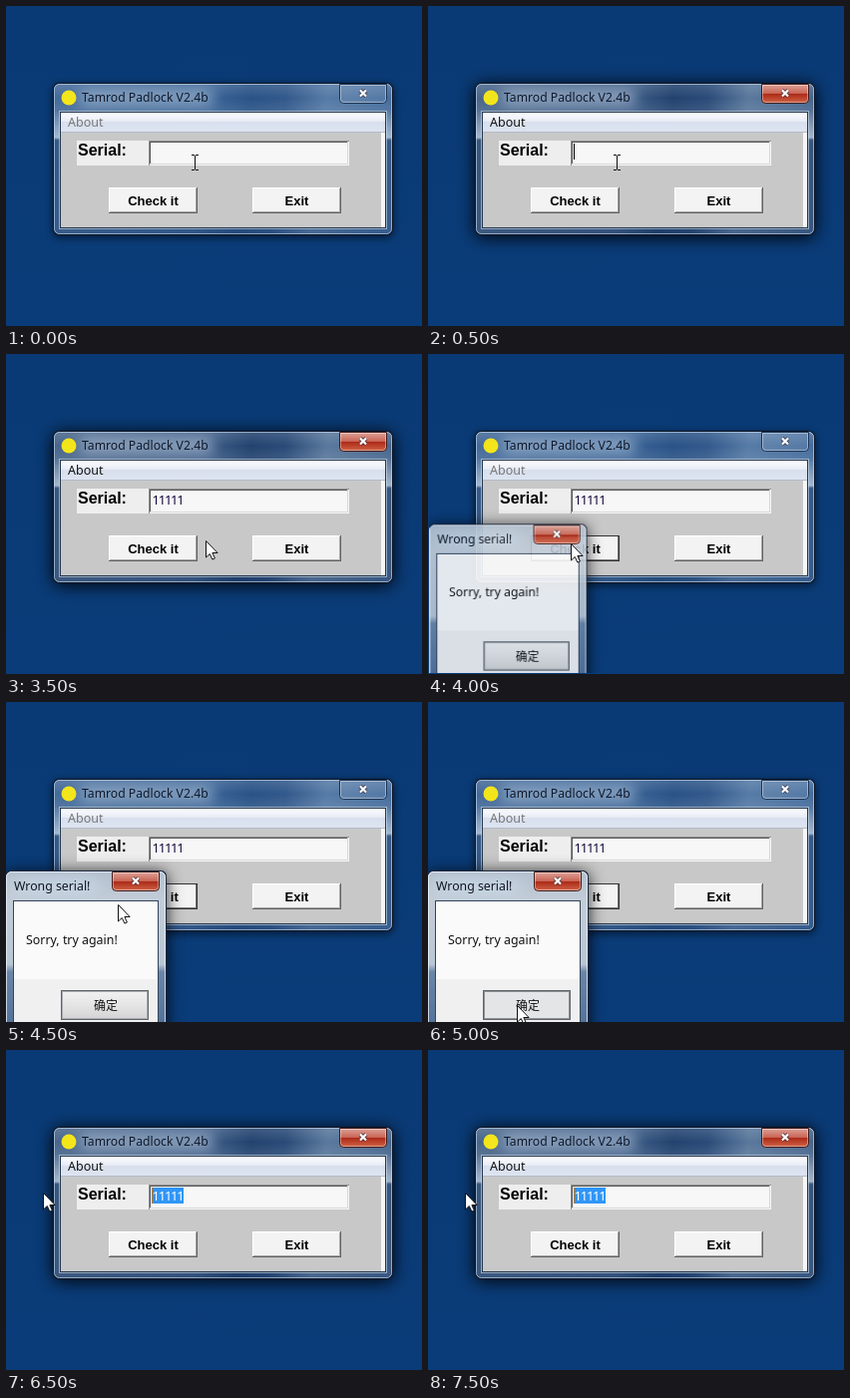
Write an HTML page with a canvas that moves like this. It is 417 px wide and 321 px high and loops after 8 s.

```html
<!DOCTYPE html>
<html lang="en">
<head>
<meta charset="utf-8">
<title>Serial check</title>
<style>
html, body { margin: 0; width: 417px; height: 321px; overflow: hidden; background: #093a77; }
canvas { display: block; }
</style>
</head>
<body>
<canvas id="stage" width="417" height="321"></canvas>
<script>
const W = 417, H = 321, STEP = 500, LOOP = 8000;
const screen = document.getElementById('stage').getContext('2d');
const layer = document.createElement('canvas');
layer.width = W;
layer.height = H;
let c = screen;

const UI = '"Noto Sans", "Open Sans", sans-serif';
const ARIAL = '"Liberation Sans", Arial, sans-serif';
const HAN = '"Noto Sans CJK SC", "Noto Sans CJK", "Noto Sans CJK JP", sans-serif';

// One entry per half second; missing keys mean "off".
const SERIAL = '11111';
const beam = { beam: [189, 157] };
const steps = [
  { idle: true, ...beam },
  { caret: 146, ...beam },
  { ...beam },
  { caret: 146, ...beam },
  { typed: 2, caret: 159 },
  { typed: 4, caret: 171 },
  { typed: 5, caret: 177 },
  { typed: 5, arrow: [200, 187] },
  { typed: 5, idle: true, focus: true, dialog: 'opening', arrow: [143, 190] },
  { typed: 5, idle: true, focus: true, dialog: 'open', arrow: [112, 203] },
  { typed: 5, idle: true, focus: true, dialog: 'hover', arrow: [89, 304] },
  { typed: 5, focus: true, dots: true, beam: [188, 157] },
  { typed: 5, caret: 177, beam: [174, 145] },
  { typed: 5, selected: true, caret: 146, arrow: [37, 143] },
  { typed: 5, selected: true, arrow: [37, 143] },
  { typed: 5, selected: true, caret: 146, arrow: [37, 143] }
];

function rect(x, y, w, h, fill) {
  c.fillStyle = fill;
  c.fillRect(x, y, w, h);
}

function frame(x, y, w, h, color) {
  c.strokeStyle = color;
  c.lineWidth = 1;
  c.strokeRect(x + 0.5, y + 0.5, w - 1, h - 1);
}

function round(x, y, w, h, r, fill, stroke) {
  c.beginPath();
  c.roundRect(x, y, w, h, r);
  if (fill) { c.fillStyle = fill; c.fill(); }
  if (stroke) { c.strokeStyle = stroke; c.lineWidth = 1; c.stroke(); }
}

function grad(x0, y0, x1, y1, ...stops) {
  const g = c.createLinearGradient(x0, y0, x1, y1);
  stops.forEach(([at, color]) => g.addColorStop(at, color));
  return g;
}

function text(str, x, y, font, color, align = 'left', spacing = 0) {
  c.font = font;
  c.fillStyle = color;
  c.textAlign = align;
  c.letterSpacing = spacing + 'px';
  c.fillText(str, x, y);
  c.letterSpacing = '0px';
}

function shadow(x, y, w, h, blur, alpha) {
  c.save();
  c.shadowColor = `rgba(0,0,0,${alpha})`;
  c.shadowBlur = blur;
  c.shadowOffsetY = 2;
  round(x, y, w, h, 6, '#10182a');
  c.restore();
}

function glow(x, y, w, h, alpha) {
  c.save();
  c.filter = 'blur(7px)';
  round(x, y, w, h, 8, `rgba(205,220,236,${alpha})`);
  c.restore();
}

function closeButton(x, y, w, h, active) {
  const fill = active
    ? grad(0, y, 0, y + h, [0, '#dda196'], [0.45, '#c96555'], [0.5, '#ad2b18'], [1, '#d2694c'])
    : 'rgba(255,255,255,0.08)';
  round(x + 0.5, y - 0.5, w - 1, h, [0, 0, 4, 4], fill, active ? '#421c1c' : '#1c3556');
  round(x + 1.5, y + 0.5, w - 3, h - 2, [0, 0, 3, 3], null, 'rgba(255,255,255,0.4)');
  const cx = x + w / 2, cy = y + h / 2 - 1;
  const cross = (width, color) => {
    c.lineWidth = width;
    c.strokeStyle = color;
    c.beginPath();
    c.moveTo(cx - 3, cy - 3); c.lineTo(cx + 3, cy + 3);
    c.moveTo(cx + 3, cy - 3); c.lineTo(cx - 3, cy + 3);
    c.stroke();
  };
  cross(4, 'rgba(50,40,55,0.65)');
  cross(2.2, '#fff');
}

function button(label, x, focus, dots) {
  const y = 182, w = 89, h = 26;
  rect(x, y, w, h, '#f3f3f3');
  rect(x, y, w, 1, '#fff');
  rect(x, y, 1, h, '#fff');
  rect(x, y + h - 1, w, 1, '#626262');
  rect(x + w - 1, y, 1, h, '#626262');
  rect(x + 1, y + h - 2, w - 2, 1, '#a5a5a5');
  rect(x + w - 2, y + 1, 1, h - 2, '#a5a5a5');
  if (focus) {
    frame(x, y, w, h, '#333');
    rect(x + 1, y + h - 2, w - 2, 1, '#777');
    rect(x + w - 2, y + 1, 1, h - 2, '#777');
  }
  if (dots) {
    c.setLineDash([1, 1]);
    c.lineDashOffset = 0.5;
    frame(x + 3, y + 3, w - 6, h - 6, '#000');
    c.setLineDash([]);
  }
  text(label, x + w / 2, 200, 'bold 13px ' + ARIAL, '#000', 'center');
}

function mainWindow(s) {
  const x = 47, y = 77, w = 341, h = 153, on = !s.idle;
  shadow(x, y, w, h, on ? 17 : 9, on ? 0.95 : 0.6);
  const fill = on
    ? grad(x, y, x + w, y + 40, [0, '#4a678b'], [0.46, '#3d5c86'], [0.58, '#23436f'], [0.68, '#2a4b78'], [0.8, '#5a789c'], [1, '#45658d'])
    : grad(x, y, x + w, y + 40, [0, '#456b99'], [0.46, '#3a6395'], [0.58, '#2a5387'], [0.68, '#32598b'], [0.8, '#567ba6'], [1, '#436b9c']);
  round(x + 0.5, y + 0.5, w - 1, h - 1, 6, fill, '#0c1526');
  c.save();
  c.beginPath();
  c.roundRect(x + 1, y + 1, w - 2, h - 2, 5);
  c.clip();
  rect(x, y, w, h, grad(0, y, 0, y + h,
    [0, 'rgba(255,255,255,0.14)'], [0.1, 'rgba(255,255,255,0)'], [0.18, 'rgba(255,255,255,0.08)'],
    [0.36, 'rgba(225,235,246,0.6)'], [0.38, 'rgba(10,40,85,0.25)'], [1, 'rgba(10,40,85,0.2)']));
  glow(72, 85, 136, 14, on ? 0.62 : 0.58);
  c.restore();
  round(x + 1.5, y + 1.5, w - 3, h - 3, 5, null, 'rgba(205,222,240,0.62)');

  c.beginPath();
  c.arc(63, 92, 7.5, 0, Math.PI * 2);
  c.fillStyle = '#f3e51c';
  c.fill();
  text('Tamrod Padlock V2.4b', 76, 96, '12.2px ' + UI, '#10192b');
  closeButton(334, 79, 48, 19, on);

  frame(53, 105, 329, 119, 'rgba(215,228,240,0.6)');
  frame(54, 106, 327, 117, '#26384f');
  rect(55, 107, 325, 19, grad(0, 107, 0, 126, [0, '#fcfdff'], [0.45, '#e8ecf5'], [0.5, '#d8dfee'], [1, '#dde4f1']));
  rect(55, 126, 325, 1, '#b5bac6');
  text('About', 62, 121, '12.5px ' + UI, on ? '#111' : '#777');

  rect(55, 127, 325, 95, '#c8c8c8');
  rect(376, 127, 4, 95, '#f6f6f6');
  rect(71, 135, 72, 25, '#eeeeee');
  text('Serial:', 72, 150, 'bold 16px ' + ARIAL, '#000');

  rect(143, 135, 201, 25, '#f7f7f7');
  rect(143, 135, 201, 1, '#909090');
  rect(143, 135, 1, 25, '#909090');
  rect(144, 136, 199, 1, '#555');
  rect(144, 136, 1, 23, '#555');
  rect(144, 158, 199, 1, '#d8d8d8');
  rect(342, 136, 1, 23, '#d8d8d8');
  if (s.selected) rect(147, 138, 31, 16, '#3096f8');
  if (s.typed) {
    text(SERIAL.slice(0, s.typed), 146.5, 151, '13px ' + UI, s.selected ? '#fff' : '#14083c', 'left', -1.24);
  }
  if (s.caret) rect(s.caret, 138, 1, 16, s.selected ? '#c87a20' : '#000');

  button('Check it', 103, s.focus, s.dots);
  button('Exit', 247);
}

function dialogWindow(hover) {
  const x = -1, y = 169, w = 162, h = 176;
  shadow(x, y, w, h, 16, 0.85);
  round(x + 0.5, y + 0.5, w - 1, h, 6,
    grad(0, y, 0, H, [0, '#b2bfcd'], [0.2, '#c3cdd8'], [0.62, '#b9c6d4'], [0.67, '#6a86a8'], [1, '#55749b']), '#18263b');
  c.save();
  c.beginPath();
  c.roundRect(x + 1, y + 1, w - 2, h, 5);
  c.clip();
  glow(5, 178, 88, 14, 0.75);
  c.restore();
  round(x + 1.5, y + 1.5, w - 3, h, 5, null, 'rgba(240,246,252,0.75)');
  text('Wrong serial!', 8, 189, '12.3px ' + UI, '#101520');
  closeButton(106, 171, 48, 19, true);

  frame(7, 199, 146, 140, '#34445a');
  rect(8, 200, 144, 78, '#fafafa');
  rect(8, 278, 144, 50, '#f0f0f0');
  text('Sorry, try again!', 20, 243, '12.4px ' + UI, '#111');

  rect(55, 289, 88, 30, hover ? '#e3e5e7' : grad(0, 289, 0, 319, [0, '#f2f2f2'], [0.5, '#e5e5e5'], [1, '#d2d2d2']));
  frame(55, 289, 88, 30, '#5f6468');
  frame(56, 290, 86, 28, hover ? '#8b9094' : '#a9adb2');
  text('确定', 100, 309, '12px ' + HAN, '#111', 'center');
}

function dialog(mode) {
  c = layer.getContext('2d');
  c.clearRect(0, 0, W, H);
  dialogWindow(mode === 'hover');
  c = screen;
  c.save();
  if (mode === 'opening') {
    // The box grows a little while it fades in.
    c.globalAlpha = 0.91;
    c.translate(80, 245);
    c.scale(0.982, 0.982);
    c.translate(-80, -245);
  }
  c.drawImage(layer, 0, 0);
  c.restore();
}

function arrow([x, y]) {
  const pts = [[0, 0], [0, 16.5], [3.8, 13], [6.4, 18.6], [8.9, 17.5], [6.4, 12], [11.6, 12]];
  c.beginPath();
  pts.forEach(([dx, dy]) => c.lineTo(x + 0.5 + dx, y + 0.5 + dy));
  c.closePath();
  c.fillStyle = '#fff';
  c.fill();
  c.strokeStyle = '#111';
  c.lineWidth = 1;
  c.stroke();
}

function iBeam([x, y]) {
  rect(x, y - 7, 1, 14, '#111');
  for (const dy of [-8, 7]) {
    rect(x - 3, y + dy, 3, 1, '#111');
    rect(x + 1, y + dy, 3, 1, '#111');
  }
}

function draw(now) {
  const s = steps[Math.floor((now % LOOP) / STEP)];
  c = screen;
  rect(0, 0, W, H, grad(0, 0, 0, H, [0, '#093a75'], [1, '#0a3c79']));
  mainWindow(s);
  if (s.dialog) dialog(s.dialog);
  if (s.arrow) arrow(s.arrow);
  if (s.beam) iBeam(s.beam);
}

let start;
function tick(now) {
  start ??= now;
  draw(Math.max(0, now - start));
  requestAnimationFrame(tick);
}
draw(0);
requestAnimationFrame(tick);
</script>
</body>
</html>
```
